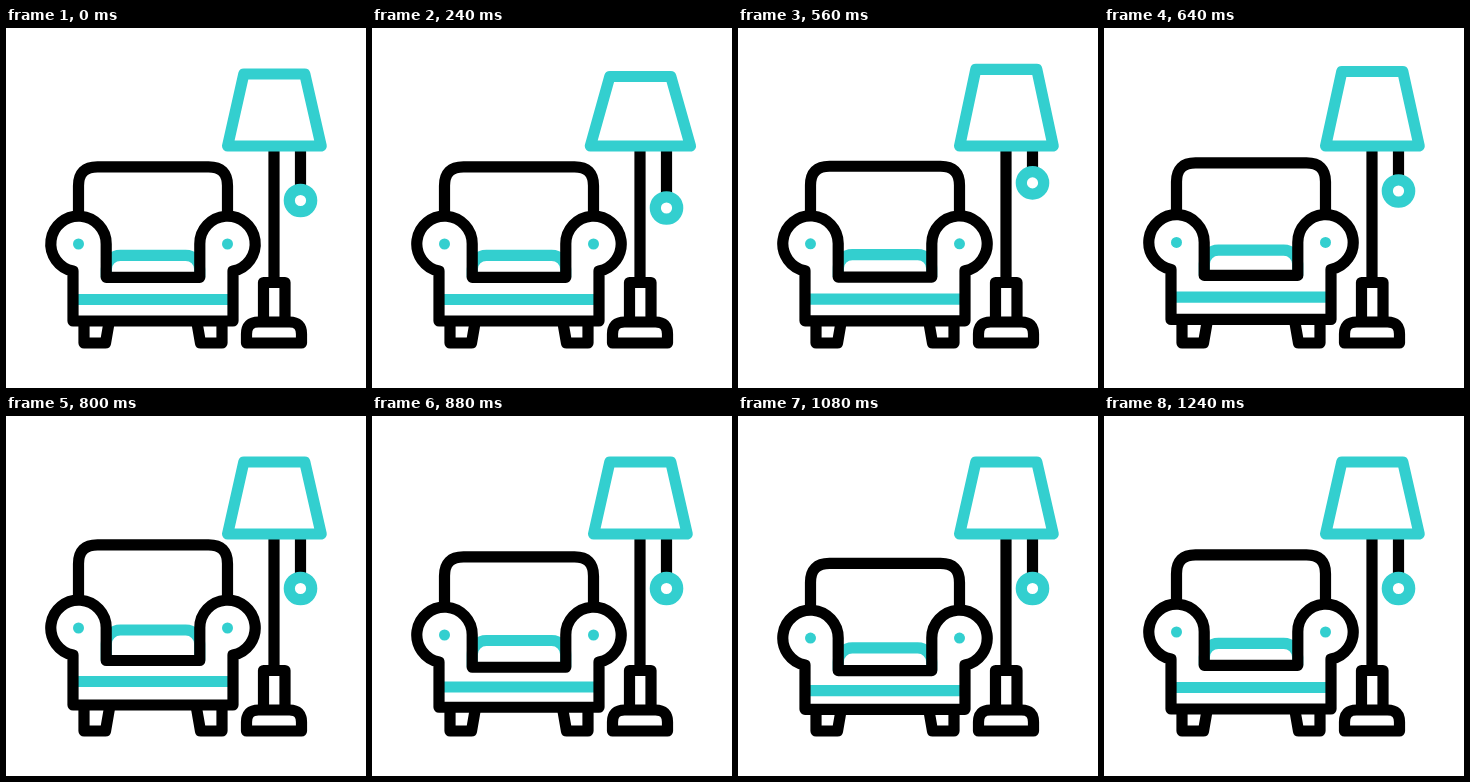
An HTML page for the animation above (2 s loop, 360x360 px).

```html
<!DOCTYPE html>
<html lang="en">
<head>
<meta charset="utf-8">
<title>Armchair and lamp</title>
<style>
  html, body { margin: 0; width: 100%; height: 100%; overflow: hidden; background: #fff; }
  svg { display: block; width: 100vw; height: 100vh; }
  path, circle { fill: none; stroke: #000; stroke-width: 11.2; stroke-linejoin: round; }
  .accent { stroke: #33cfcf; }
  .dot { fill: #33cfcf; stroke: none; }
  .white { fill: #fff; }
</style>
</head>
<body>
<svg viewBox="0 0 360 360">
  <g id="lamp">
    <path d="M268 118V254"/>
    <path id="cord"/>
    <path d="M257.5 294V254.5H279V294"/>
    <path d="M240.5 315H295.5V306Q295.5 294 283.5 294H252.5Q240.5 294 240.5 306Z"/>
    <path id="shade" class="accent white"/>
    <circle id="ring" class="accent white" cx="294.5" r="11.2"/>
  </g>
  <g id="chair">
    <path d="M78 292V315H99.5L103.5 292"/>
    <path d="M216 292V315H194.5L190.5 292"/>
    <path id="back"/>
    <path id="cushion" class="accent"/>
    <path id="stripe" class="accent"/>
    <path id="body"/>
    <circle class="dot arm" cx="72.5" r="5.5"/>
    <circle class="dot arm" cx="221.5" r="5.5"/>
  </g>
</svg>
<script>
  const LOOP = 2000, STEP = 40;
  const $ = id => document.getElementById(id);
  const dots = document.querySelectorAll('.arm');

  // Each part rests, swings to two extremes and rests again.
  const lampTimes = [120, 360, 520, 760];
  const chairTimes = [520, 800, 960, 1240];
  const lampPoses = { top: [46, 51, 41], flare: [0, 6.5, 0], pull: [172.5, 187.5, 153.5] };
  const chairPoses = {
    back: [138.8, 128.8, 153],
    arm: [216, 212, 226],
    seat: [249.3, 244.5, 258],
    cushion: [227.3, 214, 235],
    stripe: [271.5, 265.5, 276.5],
    base: [293, 289, 293.5]
  };

  // Smooth ease, close to cubic-bezier(.33, 0, .67, 1)
  const ease = p => p * p * (3 - 2 * p);

  function pose(poses, times, t) {
    const now = {};
    for (const key in poses) {
      const [rest, a, b] = poses[key];
      const values = [rest, a, b, rest];
      const i = times.findIndex(end => t < end);
      if (i < 1) now[key] = rest;
      else {
        const p = ease((t - times[i - 1]) / (times[i] - times[i - 1]));
        now[key] = values[i - 1] + (values[i] - values[i - 1]) * p;
      }
    }
    return now;
  }

  const draw = (id, d) => $(id).setAttribute('d', d);

  function drawLamp({ top, flare, pull }) {
    draw('shade', `M237.8 ${top}H298.8L${315.2 + flare} 118H${221.6 - flare}Z`);
    draw('cord', `M294.5 118V${pull - 8}`);
    $('ring').setAttribute('cy', pull);
  }

  function drawChair({ back, arm, seat, cushion, stripe, base }) {
    const r = 27.7, low = arm + 27;
    draw('back', `M72.5 ${arm - r}V${back + 19}Q72.5 ${back} 91.5 ${back}H202.5Q221.5 ${back} 221.5 ${back + 19}V${arm - r}`);
    draw('cushion', `M100.3 ${seat}V${cushion + 14}a14 14 0 0 1 14 -14H179.7a14 14 0 0 1 14 14V${seat}`);
    draw('stripe', `M70 ${stripe}H224`);
    draw('body', `M67 ${low}A${r} ${r} 0 1 1 100.2 ${arm}V${seat}H193.8V${arm}A${r} ${r} 0 1 1 227 ${low}V${base}H67Z`);
    dots.forEach(dot => dot.setAttribute('cy', arm));
  }

  function frame() {
    const t = Math.floor((performance.now() + 4) / STEP) * STEP % LOOP;
    drawLamp(pose(lampPoses, lampTimes, t));
    drawChair(pose(chairPoses, chairTimes, t));
    requestAnimationFrame(frame);
  }
  frame();
</script>
</body>
</html>
```
